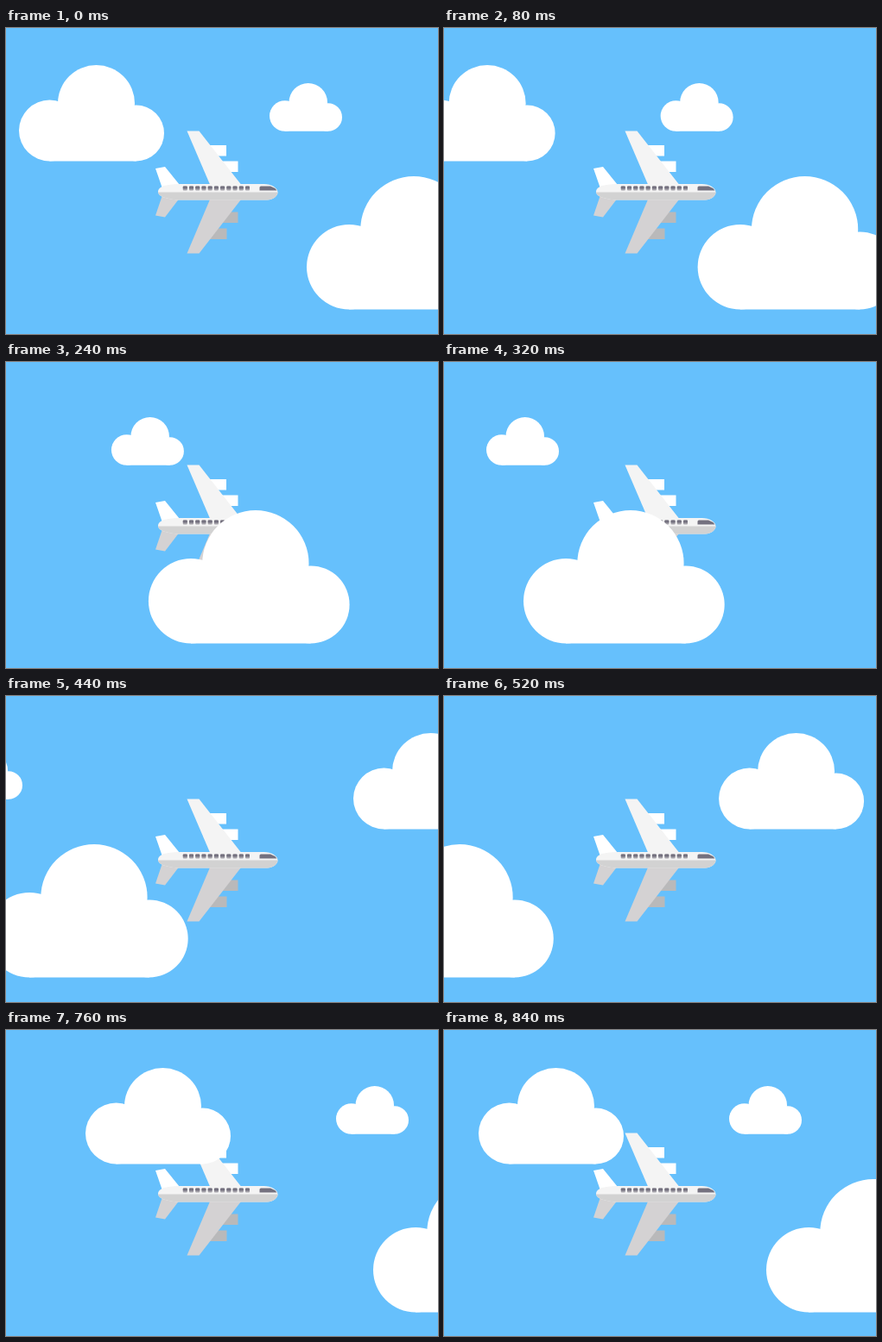
An HTML page for the animation above (880 ms loop, 500 px wide and 355 px high).

```html
<!DOCTYPE html>
<html lang="en">
<head>
<meta charset="utf-8">
<title>Plane in the clouds</title>
<style>
  html, body { margin: 0; width: 100%; height: 100%; overflow: hidden; background: #66c0fc; }
  svg { display: block; width: 500px; height: 355px; }
</style>
</head>
<body>
<svg viewBox="0 0 500 355">
  <defs>
    <g id="cloud" fill="#fff">
      <circle cx="35.5" cy="76" r="35.5"/>
      <circle cx="89.5" cy="44.5" r="44.5"/>
      <circle cx="135.5" cy="79" r="32.5"/>
      <path d="M35.5 70H135.5V111.5H35.5Z"/>
    </g>
    <g id="clouds">
      <use href="#cloud" transform="translate(15 43)"/>
      <use href="#cloud" transform="translate(305 64) scale(.5)"/>
      <use href="#cloud" transform="translate(348 172) scale(1.385)"/>
    </g>
    <clipPath id="lower"><path d="M170 190.500H320V205H170Z"/></clipPath>
  </defs>

  <g id="plane">
    <path fill="#fff" d="M230 136H255V148.500H230ZM240 154.500H268.500V167H240Z"/>
    <path fill="#b9b9ba" d="M240 213.500H268.500V226H240ZM230 232.500H255.500V245H230Z"/>
    <path fill="#f4f4f4" d="M209.500 119.500H223.500L272 181.500H236Z"/>
    <path fill="#d4d2d3" d="M236 199H272L223.500 261.500H209.500Z"/>
    <path fill="#fff" d="M173 163L184 161L201 182L181 186Z"/>
    <path fill="#d4d2d3" d="M181 194L200 198.500L184 219.500L173 217.500Z"/>
    <path id="body" fill="#f4f4f4" d="M176 190C176 186 180 183 188 182Q194 181 202 181H298C308 181 314.500 186 314.500 190.500C314.500 195 309 199.500 302 199.500H202C188 199 176 196 176 190Z"/>
    <use href="#body" clip-path="url(#lower)" style="filter:brightness(.86)"/>
    <path fill="#74717f" d="M295 183.500H306Q311 185 313.500 188.500H293.500V185Q293.500 183.500 295 183.500Z"/>
    <g id="windows"></g>
  </g>

  <g id="sky">
    <use href="#clouds"/>
    <use href="#clouds" x="757"/>
  </g>
</svg>
<script>
const LOOP = 880, STEP = 40, WIDTH = 757;
// [time, distance travelled], with one neighbour on each side of the loop
const path = [[-40, -25], [0, 0], [160, 115], [320, 256], [440, 370],
              [600, 537], [760, 680], [840, 732], [880, WIDTH], [1040, 872]];

document.getElementById('windows').innerHTML = Array.from({ length: 11 }, (_, i) =>
  `<g transform="translate(${204.8 + i * 7.22} 183.5)">
    <rect width="5" height="5" rx="1" fill="#a5a3aa"/>
    <path d="M0 3V1Q0 0 1 0H4Q5 0 5 1V3Z" fill="#74717f"/>
  </g>`).join('');

const slope = (a, b) => (b[1] - a[1]) / (b[0] - a[0]);

function tangent(i) {
  const [a, b, c] = path.slice(i - 1, i + 2);
  const w = (b[0] - a[0]) / (c[0] - a[0]);
  return slope(a, b) * (1 - w) + slope(b, c) * w;
}

function distance(t) {
  let i = 1;
  while (t >= path[i + 1][0]) i++;
  const [t0, s0] = path[i], [t1, s1] = path[i + 1];
  const h = t1 - t0, u = (t - t0) / h, v = 1 - u;
  return s0 * v * v * (1 + 2 * u) + s1 * u * u * (3 - 2 * u)
       + h * u * v * (tangent(i) * v - tangent(i + 1) * u);
}

const sky = document.getElementById('sky');
function draw(now) {
  const t = Math.floor(now % LOOP / STEP) * STEP;
  const drop = Math.min(1, Math.max(0, (t - 600) / 120));
  sky.setAttribute('transform', `translate(${-distance(t)} ${drop})`);
  requestAnimationFrame(draw);
}
draw(0);
</script>
</body>
</html>
```
